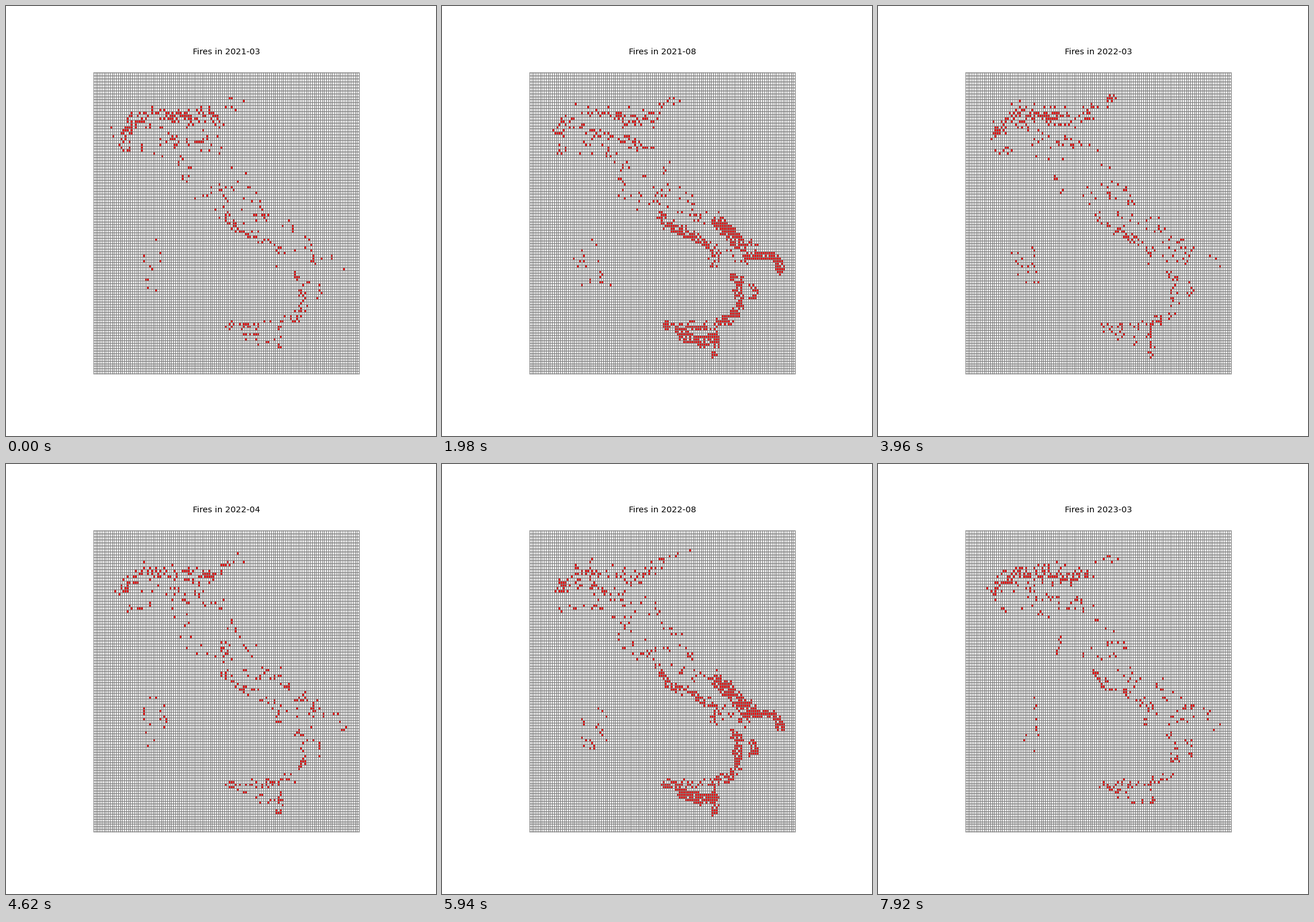
These frames come from a looping animation (748 by 748 pixels, 8 s). A matplotlib script:

```python
import numpy as np
import matplotlib.pyplot as plt
from matplotlib.animation import FuncAnimation
from matplotlib.collections import LineCollection, PolyCollection

SIZE = 748
DPI = 74.8
COLS, ROWS = 130, 110
INTERVAL, LOOP, HOLD = 40, 8000, 330
MONTHS = LOOP // HOLD + 1

# Share of burning cells in March, July and November, and edge sharpness.
KINDS = {
    "city": (0.45, 0.38, 0.06, 2),
    "field": (0.18, 0.26, 0.02, 2),
    "hill": (0.10, 0.15, 0.02, 2),
    "ridge": (0.20, 0.45, 0.03, 4),
    "coast": (0.28, 0.85, 0.03, 8),
    "plain": (0.09, 0.97, 0.05, 10),
}

# Belts of the map: kind, half-width and a path in px.
BELTS = [
    ("city", 12, [(205, 218), (214, 206), (238, 190), (265, 188), (300, 192),
                  (335, 196), (366, 190)]),
    ("field", 13, [(240, 208), (291, 229), (328, 236), (368, 250)]),
    ("field", 9, [(372, 178), (410, 160)]),
    ("hill", 9, [(208, 251), (270, 246), (318, 276), (316, 322)]),
    ("hill", 20, [(345, 328), (395, 328)]),
    ("hill", 9, [(385, 275), (405, 293), (428, 318), (437, 350)]),
    ("hill", 15, [(420, 370), (463, 366)]),
    ("coast", 8, [(381, 364), (392, 382), (414, 393), (434, 398), (457, 414)]),
    ("ridge", 9, [(462, 413), (476, 428), (474, 449)]),
    ("hill", 14, [(487, 426), (524, 434)]),
    ("plain", 12.5, [(481, 377), (497, 392), (519, 416)]),
    ("ridge", 11, [(530, 414), (538, 420), (528, 445)]),
    ("plain", 7.5, [(536, 434), (574, 434), (587, 447), (589, 461)]),
    ("coast", 8, [(507, 470), (519, 478), (514, 500), (517, 525),
                  (503, 546), (484, 547), (474, 557)]),
    ("coast", 6.5, [(540, 485), (545, 496), (541, 506)]),
    ("coast", 9, [(391, 555), (413, 566)]),
    ("ridge", 8, [(417, 556), (464, 556)]),
    ("plain", 10.5, [(420, 573), (452, 583), (470, 582)]),
    ("coast", 5.5, [(475, 570), (478, 588), (473, 608)]),
    ("hill", 9, [(241, 430), (244, 456), (260, 495)]),
    ("hill", 8, [(264, 410), (281, 475)]),
]


def snap(v):
    """Pixel centre on a 1000 px canvas, scaled to the stage."""
    return (np.floor(v + 0.5) + 0.5) * SIZE / 1000


def mercator(lat):
    return np.log(np.tan(np.radians(45 + lat / 2)))


xs = snap(512.5 + 4.747 * (np.arange(COLS + 1) - COLS / 2))
north = mercator(np.linspace(35.72, 47.27, ROWS + 1))
ys = snap(np.interp(north, north[[0, -1]], [855, 155]))
CX, CY = np.meshgrid((xs[:-1] + xs[1:]) / 2, (ys[:-1] + ys[1:]) / 2)


def distance(path):
    """Distance of every cell centre to a polyline."""
    best = np.full(CX.shape, np.inf)
    for (x0, y0), (x1, y1) in zip(path, path[1:]):
        dx, dy = x1 - x0, y1 - y0
        t = np.clip(((CX - x0) * dx + (CY - y0) * dy) / (dx * dx + dy * dy), 0, 1)
        best = np.minimum(best, np.hypot(CX - x0 - t * dx, CY - y0 - t * dy))
    return best


SHAPES = [(kind, np.exp(-(distance(path) / half) ** KINDS[kind][3]))
          for kind, half, path in BELTS]
HABIT = np.random.default_rng(11).random(CX.shape)


def share(kind, month):
    """Seasonal share of burning cells, eased between the key months."""
    key, part = divmod(month % 12, 4)
    t = part / 4
    if key < 2:
        t *= t
    levels = KINDS[kind][:3]
    return levels[key] ** (1 - t) * levels[(key + 1) % 3] ** t


def burning(month):
    rng = np.random.default_rng(500 + month)
    # Some cells keep their own luck, so the same places burn again.
    luck = np.where(rng.random(CX.shape) < 0.25, HABIT, rng.random(CX.shape))
    chance = np.max([share(kind, month) * s for kind, s in SHAPES], axis=0)
    return np.argwhere(luck < chance)


def box(r, c):
    x0, x1, y0, y1 = xs[c], xs[c + 1], ys[r], ys[r + 1]
    return [(x0, y0), (x1, y0), (x1, y1), (x0, y1)]


def label(month):
    year, m = divmod(month + 2, 12)
    return f"Fires in {2021 + year}-{m + 1:02d}"


BOXES = [[box(r, c) for r, c in burning(m)] for m in range(MONTHS)]

fig = plt.figure(figsize=(SIZE / DPI, SIZE / DPI), dpi=DPI, facecolor="white")
ax = fig.add_axes([0, 0, 1, 1])
ax.set_xlim(0, SIZE)
ax.set_ylim(SIZE, 0)
ax.axis("off")

red = PolyCollection(BOXES[0], facecolor="red", edgecolor="none",
                     snap=False, zorder=1)
lines = [[(x, ys[0]), (x, ys[-1])] for x in xs]
lines += [[(xs[0], y), (xs[-1], y)] for y in ys]
grid = LineCollection(lines, colors="gray", linewidths=1.3 * 72 / DPI,
                      capstyle="projecting", snap=False, zorder=2)
for part in (red, grid):
    ax.add_collection(part, autolim=False)
title = ax.text(0.5125 * SIZE, 83.5, label(0), fontsize=14,
                family="DejaVu Sans", color="black", ha="center", va="baseline")


def draw(i):
    month = i * INTERVAL // HOLD
    red.set_verts(BOXES[month])
    title.set_text(label(month))
    return red, grid, title


anim = FuncAnimation(fig, draw, frames=LOOP // INTERVAL, interval=INTERVAL,
                     init_func=lambda: draw(0), repeat=True, repeat_delay=0,
                     blit=False)
plt.show()
```
